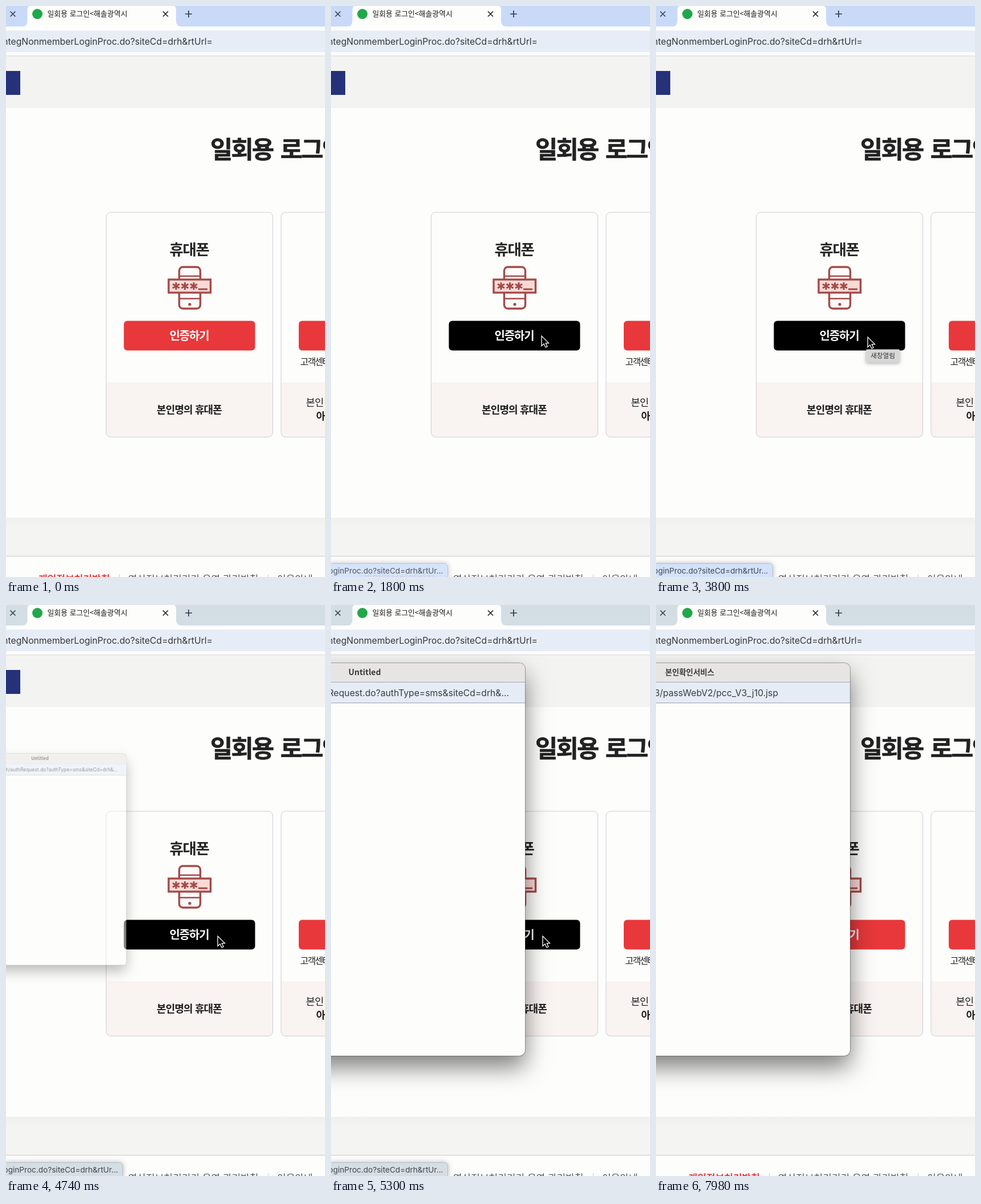
Animation of 559x1002 px, one loop 8000 ms. Source, as an HTML page:

```html
<!DOCTYPE html>
<html lang="ko">
<head>
<meta charset="utf-8">
<title>일회용 로그인</title>
<style>
  html, body { margin: 0; width: 100%; height: 100%; overflow: hidden; background: #fdfdfc; }
  #stage { position: relative; width: 559px; height: 1002px; overflow: hidden; }
  svg { position: absolute; left: 0; top: 0; }
  text { font-family: "Noto Sans CJK KR", "Noto Sans CJK", sans-serif; white-space: pre; }
  .ui { font-family: Inter, Roboto, sans-serif; }
  .mid { text-anchor: middle; }
  .end { text-anchor: end; }
  .bold { font-weight: 700; }
  #status { filter: drop-shadow(0 0 4px rgba(40, 50, 70, .35)); }
  #tip { filter: drop-shadow(0 2px 3px rgba(0, 0, 0, .3)); }
  #popup {
    position: absolute; left: -220px; top: 102px; width: 560px; height: 689px;
    border-radius: 10px; background: #fdfdfc;
    box-shadow: 0 0 0 1px rgba(70, 70, 75, .45), 0 20px 42px rgba(0, 0, 0, .5);
  }
  #popup svg { border-radius: 10px; }
</style>
</head>
<body>
<div id="stage">
  <svg width="559" height="1002" viewBox="0 0 559 1002">
    <defs>
      <linearGradient id="foot" x2="0" y2="1">
        <stop offset="0" stop-color="#f0f0ed"/><stop offset=".25" stop-color="#f4f4f3"/>
      </linearGradient>
      <path id="cross" d="M-4-4L4 4M4-4L-4 4" stroke-width="1.7" stroke-linecap="round"/>
      <path id="star" d="M0-6.5V6.5M-6-3.5L6 3.5M6-3.5L-6 3.5"/>
    </defs>

    <!-- browser chrome -->
    <rect id="tabs" width="559" height="36"/>
    <path d="M28 36Q37.500 36 37.500 26V6Q38 1 41 0H294Q298 1 298 6V26Q298 36 308 36Z" fill="#fdfdfc"/>
    <use href="#cross" x="12" y="14" stroke="#3c4350"/>
    <circle cx="55" cy="14" r="9" fill="#20a84a"/>
    <text x="72.500" y="18" font-size="12.8" font-weight="500" fill="#1a1a1a">일회용 로그인&lt;해솔광역시</text>
    <use href="#cross" x="279.500" y="14" stroke="#222"/>
    <path d="M314 14H326M320 8V20" stroke="#333a45" stroke-width="1.7"/>
    <rect y="36" width="559" height="52" fill="#fdfdfc"/>
    <rect y="43" width="559" height="38" fill="#e7edf7"/>
    <text class="ui end" x="362" y="67.500" font-size="15.7" fill="#34373c">/integNonmemberLoginProc.do?siteCd=drh&amp;rtUrl=</text>
    <rect y="87" width="559" height="1" fill="#d8d8dc"/>

    <!-- page -->
    <rect y="88" width="559" height="91" fill="#f3f3f2"/>
    <rect x="-17" y="114" width="42" height="42" fill="#25327a"/>
    <text x="358" y="267" font-size="42.500" font-weight="800" letter-spacing="-2.6" word-spacing="4" fill="#222" stroke="#222" stroke-width=".6">일회용 로그인</text>

    <g id="cards"></g>
    <text class="mid bold" x="321" y="436.500" font-size="26.500" letter-spacing="-1.3" fill="#262626">휴대폰</text>
    <g fill="none" stroke="#a34a48" stroke-width="3.4">
      <rect x="303.500" y="458" width="37" height="73" rx="6.500" fill="#fdfafa"/>
      <path d="M304 474H340M304 513.500H340" stroke-width="2.6"/>
      <circle cx="322" cy="523.500" r="2.6" fill="#a34a48" stroke="none"/>
      <rect x="285" y="480" width="73.500" height="23" fill="#fadad6"/>
      <g stroke-width="3">
        <use href="#star" x="298" y="491.500"/><use href="#star" x="313.500" y="491.500"/>
        <use href="#star" x="329" y="491.500"/><path d="M337 497H353"/>
      </g>
    </g>
    <rect id="button" x="206.500" y="552.500" width="230" height="52" rx="6"/>
    <text class="mid bold" x="321" y="586" font-size="20" letter-spacing="-1.1" fill="#fff">인증하기</text>
    <text class="mid bold" x="321" y="715" font-size="18" letter-spacing="-.9" fill="#1d1d1d">본인명의 휴대폰</text>
    <rect x="513" y="552.500" width="230" height="52" rx="6" fill="#e8383b"/>
    <text x="515.500" y="629.500" font-size="16" letter-spacing="-1.8" fill="#222">고객센터</text>
    <text x="525.500" y="701.500" font-size="17.500" letter-spacing="-.6" fill="#222">본인 명의</text>
    <text class="bold" x="543.500" y="726" font-size="17.500" letter-spacing="-.6" fill="#1d1d1d">아이핀</text>

    <!-- footer -->
    <rect y="898" width="559" height="67" fill="url(#foot)"/>
    <rect y="965" width="559" height="1" fill="#c9c9c9"/>
    <g font-size="17" fill="#555">
      <text class="bold" x="57" y="1011.500" fill="#ea3a3d">개인정보처리방침</text>
      <text x="214" y="1011.500">영상정보처리기기 운영·관리방침</text>
      <text x="475" y="1011.500">이용안내</text>
      <path d="M198.500 997V1002M459.500 997V1002" stroke="#ccc"/>
    </g>

    <g id="status">
      <path d="M-2 978.500H198Q204.500 978.500 204.500 985V1004H-2Z" stroke="#b7c0d0"/>
      <text class="ui end" x="196.500" y="995.500" font-size="13.6" fill="#41454d">LoginProc.do?siteCd=drh&amp;rtUr...</text>
    </g>
  </svg>

  <div id="popup">
    <svg width="560" height="689" viewBox="-220 102 560 689">
      <rect x="-220" y="102" width="560" height="33" fill="#e6e5e3"/>
      <rect x="-220" y="135" width="560" height="1" fill="#a4a6ba"/>
      <rect x="-220" y="136" width="560" height="35" fill="#e5ecf5"/>
      <rect x="-220" y="171" width="560" height="1.500" fill="#b4b7c6"/>
      <text id="title" class="mid bold" x="59" y="123" fill="#3b3b3b"></text>
      <text id="address" class="ui end" y="159.500" font-size="15.7" fill="#3a3d42"></text>
    </svg>
  </div>

  <svg width="559" height="1002" viewBox="0 0 559 1002">
    <g id="tip">
      <rect x="368" y="602.500" width="59" height="23" rx="2" fill="#d7d7d7"/>
      <text class="mid" x="397.500" y="618" font-size="11.700" fill="#333">새창열림</text>
    </g>
    <path id="cursor" d="M0 0V17.500L4 13.800L7 20L10 18.600L7.200 12.600H12.500Z" fill="#000" stroke="#fff" stroke-width="1.300"/>
  </svg>
</div>

<script>
const LOOP = 8000;
const el = id => document.getElementById(id);

el("cards").innerHTML = [175.5, 482].map(x => `
  <path d="M${x} 660.5h292v88q0 8-8 8h-276q-8 0-8-8z" fill="#f9f3f1"/>
  <rect x="${x}" y="362" width="292" height="394.5" rx="8" fill="none" stroke="#cdcdd9"/>`).join("");

// Piecewise linear value from [time, value] pairs
function track(keys, t) {
  if (t <= keys[0][0]) return keys[0][1];
  for (let i = 1; i < keys.length; i++) {
    const [t0, a] = keys[i - 1], [t1, b] = keys[i];
    if (t <= t1) return a + (b - a) * (t - t0) / (t1 - t0);
  }
  return keys[keys.length - 1][1];
}

const popupScale = [[4690, .43], [4740, .536], [4900, .868], [4980, 1]];
const popupAlpha = [[4690, .3], [4740, .5], [4900, .83], [4980, 1]];
const statusAlpha = [[1620, 0], [1820, 1], [6150, 1], [6350, 0]];

const requestUrl = "authRequest.do?authType=sms&siteCd=drh&...";
const pages = [
  { from: 0, title: "Untitled", size: 14, url: "h/" + requestUrl, end: 312 },
  { from: 5800, title: "해솔광역시청", size: 13.4, url: "h/" + requestUrl, end: 312 },
  { from: 7000, title: "본인확인서비스", size: 13.4, url: "V3/passWebV2/pcc_V3_j10.jsp", end: 214 }
];

function cursorAt(t) {
  const u = Math.min(1, Math.max(0, (t - 1200) / 560));
  const k = 1 - (1 - u) ** 2;
  const drift = track([[1800, 0], [2100, 2]], t);
  return [570 - 201 * k + drift, 700 - 121 * k + drift];
}

const show = (id, on) => { el(id).style.display = on ? "" : "none"; };

function draw(t) {
  const [x, y] = cursorAt(t);
  const blurred = t >= 4680;
  const hover = x < 436 && y < 604 && t < 5900;

  el("cursor").setAttribute("transform", `translate(${x} ${y})`);
  show("cursor", t >= 1200 && t < 5900);
  show("tip", t >= 2700 && t < 4500);
  el("button").setAttribute("fill", hover ? "#000" : "#e8383b");
  el("tabs").setAttribute("fill", blurred ? "#d3dee4" : "#c9daf9");
  el("status").setAttribute("fill", blurred ? "#d5dee3" : "#d3e2fb");
  el("status").setAttribute("opacity", track(statusAlpha, t));

  show("popup", t >= 4690);
  el("popup").style.transform = `scale(${track(popupScale, t)})`;
  el("popup").style.opacity = track(popupAlpha, t);

  const page = pages.filter(p => t >= p.from).pop();
  el("title").textContent = page.title;
  el("title").setAttribute("font-size", page.size);
  el("address").textContent = page.url;
  el("address").setAttribute("x", page.end);
}

const start = performance.now();
function tick() {
  draw((performance.now() - start) % LOOP);
  requestAnimationFrame(tick);
}
tick();
</script>
</body>
</html>
```
